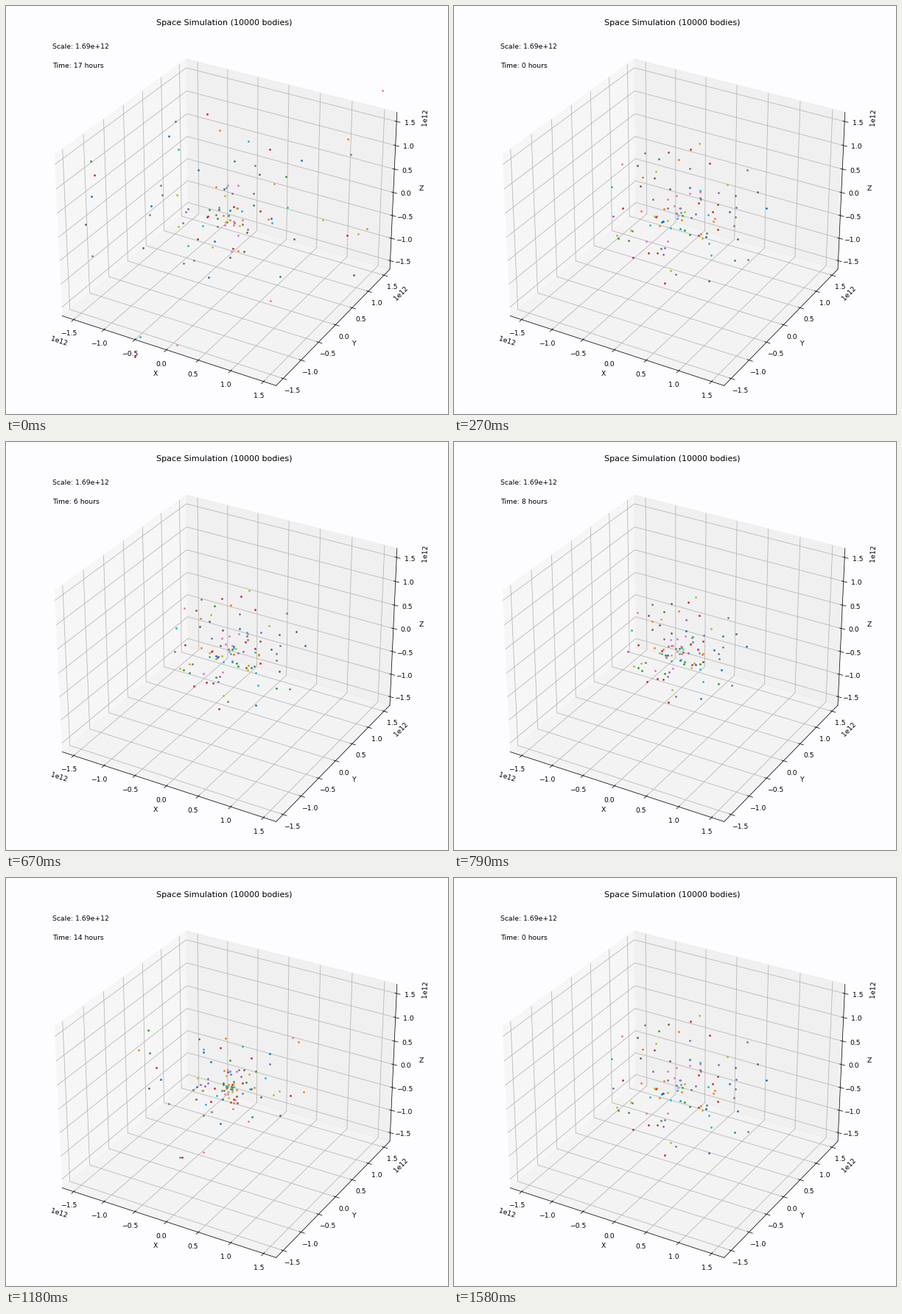
Animation, 600 px wide and 555 px high, one loop 1610 ms. Source, as a matplotlib script:

```python
import numpy as np
import matplotlib.pyplot as plt
from matplotlib.animation import FuncAnimation

W, H, DPI = 600, 555, 66.6667
LOOP, INTERVAL = 1610, 10      # ms
RUN, RUN_START, REST = 1340, 240, 30
STEP_TIME = 30.7               # ms per half simulated hour
EXIT_STEP = 34                 # step at which bodies reach their exit point
SCALE = 1.69e12
BODIES, COLORS = 100, 10
BACK = "#fdfcfe"

rng = np.random.default_rng(12)


def directions(count):
    v = rng.normal(size=(count, 3))
    return v / np.linalg.norm(v, axis=1, keepdims=True)


def column(values):
    return values[:, None]


# Bodies start at rest in a ball, fall through its centre and fly out
# roughly opposite to where they came from.
heading = directions(BODIES)
reach = rng.random(BODIES) ** 0.7
start = column(0.76 * SCALE * reach) * heading
middle = rng.normal(0, 0.04 * SCALE, (BODIES, 3))
swerve = 0.4 * directions(BODIES)
exit_range = SCALE * np.clip(rng.lognormal(np.log(0.42), 0.85, BODIES), 0.05, 1.7)
end = column(exit_range) * (swerve - heading)
pass_step = 21 + 5 * reach + rng.uniform(-1, 1, BODIES)


def positions(step):
    fall = np.clip(1 - (step / pass_step) ** 2, 0, 1) ** 0.62
    rise = np.clip((step - pass_step) / (EXIT_STEP - pass_step), 0, None)
    return middle + (start - middle) * column(fall) + (end - middle) * column(rise)


def make_space(fig):
    side = 517
    left, bottom = 37.3, 6
    ax = fig.add_axes([left / W, bottom / H, side / W, side / H],
                      projection="3d", facecolor=BACK)
    marks = np.linspace(-1.5e12, 1.5e12, 7)
    for name in "xyz":
        ax.set(**{f"{name}lim": (-SCALE, SCALE), f"{name}ticks": marks,
                  f"{name}label": name.upper()})
    ax.set_title("Space Simulation (10000 bodies)")
    ax.text2D(0.05, 0.95, f"Scale: {SCALE:.2e}", transform=ax.transAxes)
    return ax


fig = plt.figure(figsize=(9, 8.325), dpi=DPI, facecolor=BACK)
space = make_space(fig)
clock = space.text2D(0.05, 0.90, "", transform=space.transAxes)
groups = [space.plot(*start[i::COLORS].T, "o", ms=2, color=f"C{i}")[0]
          for i in range(COLORS)]


def update(frame):
    elapsed = (frame * INTERVAL - RUN_START) % RUN - REST
    step = max(0, int(elapsed / STEP_TIME))
    place = positions(step)
    for i, dots in enumerate(groups):
        dots.set_data_3d(*place[i::COLORS].T)
    clock.set_text(f"Time: {step // 2} hours")
    return [clock, *groups]


anim = FuncAnimation(fig, update, frames=LOOP // INTERVAL, interval=INTERVAL,
                     repeat=True, repeat_delay=0, blit=False)
plt.show()
```
